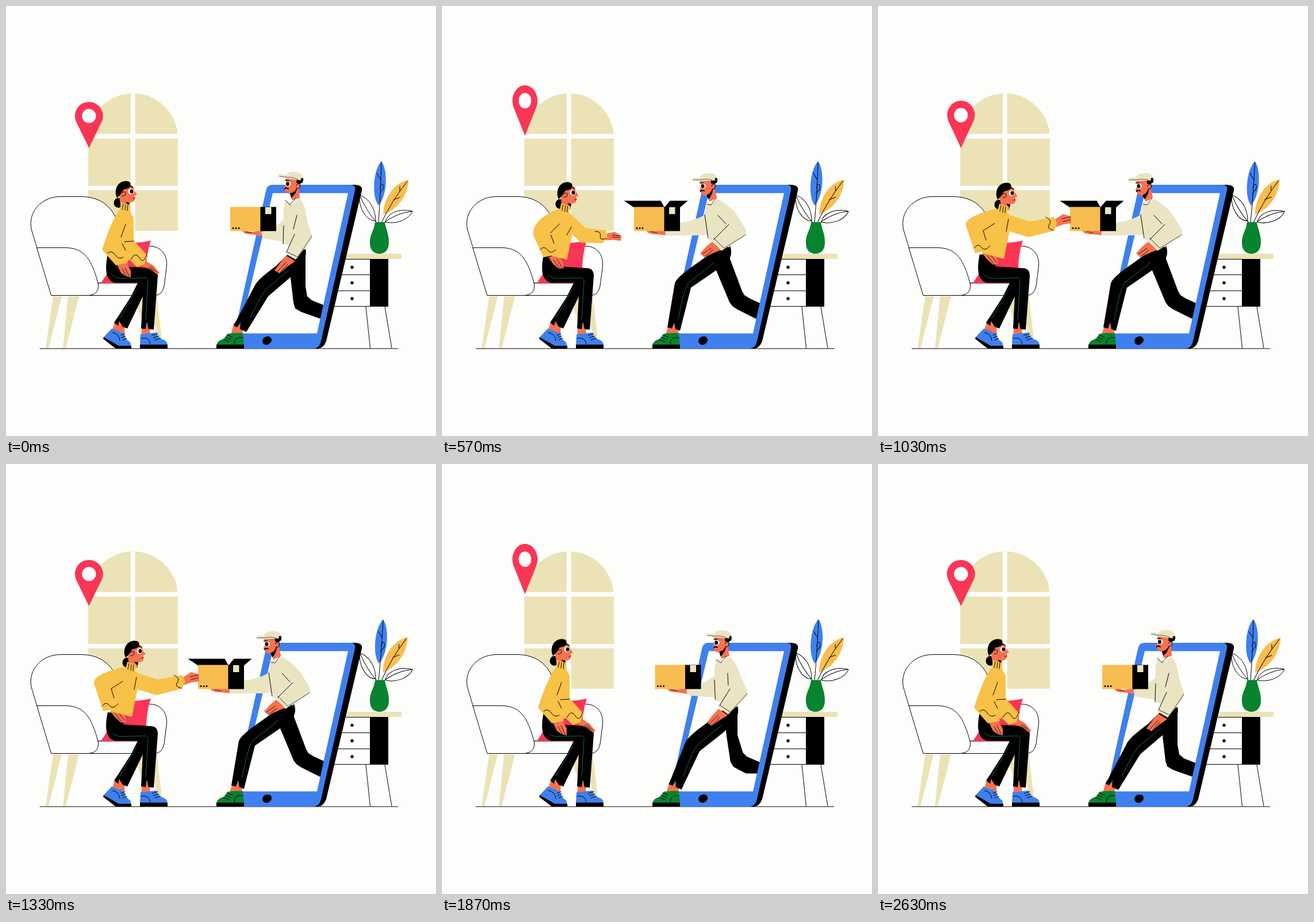
Animation of 748 by 748 pixels, one loop 2.66 s. Source, as an HTML page with a canvas:

```html
<!DOCTYPE html>
<html lang="en">
<head>
<meta charset="utf-8">
<title>Home delivery</title>
<style>
html, body { margin: 0; width: 100%; height: 100%; overflow: hidden; background: #fdfefb; }
canvas { display: block; }
</style>
</head>
<body>
<canvas id="stage" width="748" height="748"></canvas>
<script>
const ctx = document.getElementById('stage').getContext('2d');
const LOOP = 2660;
const C = {
  paper: '#fdfefb', white: '#fefefe', black: '#000', beige: '#ebe3b6', cream: '#ebe4c3',
  yellow: '#f8c148', box: '#f8bd50', red: '#fa3556', blue: '#3f80ee', green: '#08832f',
  skin: '#f6714f', seam: '#1c6250'
};

const ease = u => (1 - Math.cos(Math.PI * Math.min(1, Math.max(0, u)))) / 2;
const ramp = (t, from, to) => ease((t - from) / (to - from));
const lerp = (a, b, p) => a + (b - a) * p;

// Blends two paths that have the same commands.
function morph(a, b, p) {
  const ends = b.match(/-?[\d.]+/g);
  let i = 0;
  return a.replace(/-?[\d.]+/g, n => lerp(+n, +ends[i++], p).toFixed(2));
}
function fill(d, color) {
  ctx.fillStyle = color;
  ctx.fill(new Path2D(d));
}
function line(d, color = C.black, width = 1) {
  ctx.strokeStyle = color;
  ctx.lineWidth = width;
  ctx.stroke(new Path2D(d));
}
function outlined(d, color) {
  fill(d, color);
  line(d);
}
function rect(x, y, w, h, color) {
  ctx.fillStyle = color;
  ctx.fillRect(x, y, w, h);
}
function oval(x, y, rx, ry, color, turn = 0) {
  ctx.fillStyle = color;
  ctx.beginPath();
  ctx.ellipse(x, y, rx, ry, turn, 0, Math.PI * 2);
  ctx.fill();
}
function moved(x, y, draw) {
  ctx.save();
  ctx.translate(x, y);
  draw();
  ctx.restore();
}
function turned(x, y, angle, draw) {
  moved(x, y, () => {
    ctx.rotate(angle);
    ctx.translate(-x, -y);
    draw();
  });
}

function drawWindow() {
  fill('M143 391 V230 A78 78 0 0 1 299 230 V391Z', C.beige);
  rect(217, 150, 7.5, 242, C.paper);
  rect(142, 222.5, 158, 8, C.paper);
  rect(142, 313, 158, 7.5, C.paper);
}

// time, lift, width, height
const PIN = [
  [0, 0, 1, 1], [650, -22, .89, 1.1], [780, 0, 1.08, .9],
  [850, 0, 1.08, .9], [1050, 0, .98, 1.03], [1200, 0, 1, 1], [1330, 0, 1, 1]
];
function drawPin(time) {
  const t = time % 1330;
  const i = PIN.findIndex(k => k[0] > t);
  const a = PIN[i - 1], b = PIN[i];
  const [, lift, sx, sy] = a.map((v, k) => lerp(v, b[k], ramp(t, a[0], b[0])));
  moved(144.3, 247 + lift, () => {
    ctx.scale(sx, sy);
    ctx.fillStyle = C.red;
    ctx.beginPath();
    ctx.arc(0, -55.7, 24.4, Math.PI * .856, Math.PI * 2.144);
    ctx.lineTo(0, 0);
    ctx.fill();
    oval(0, -55.7, 12.2, 12.2, C.white);
  });
}

function drawChair() {
  fill('M82 505 H97 L74 595 H69Z M108 505 H127 L104 595 H99Z', C.beige);
  fill('M222 503 H240 L256 595 H251Z M246 503 H262 L273 595 H268Z', C.beige);
  outlined('M54 421 L44 388 C38 358 62 331.5 95 331.5 H130 C166 331.5 187 351 195 380 L215 482 H90Z', C.white);
  outlined('M236 419 Q247 417 255 418 C272 421 282 435 279 456 L275 487 Q272 503.500 258 503.500 H141 V482 H236Z', C.white);
  fill('M200 411 Q228 414 252 408 Q242 436 244 482 H165 L186 450Z', C.red);
  outlined('M54 420.500 H103 C136 420.500 149 440 160.500 484 Q162 503.500 141 503.500 H79Z', C.white);
}

function drawCabinet() {
  rect(570, 440, 63, 83, C.white);
  line('M570 440.500 H633 M570 467.500 H633 M570 495.500 H633 M570 522.500 H633');
  line('M626 523 L633.500 595 M659 523 L671 595');
  rect(633, 440, 32, 83, C.black);
  rect(588, 431, 100, 9, C.beige);
  for (const y of [454.5, 481.5, 509]) oval(602, y, 2.7, 2.7, C.black);
}

function drawPlant(time) {
  const sway = (1 - Math.cos(time / LOOP * Math.PI * 2)) / 2;
  const leaf = (angle, draw) => turned(650, 376, angle * sway, draw);
  leaf(.01, () => {
    outlined('M643 374 C627 374 613 352 615 329 C631 334 643 352 643 374Z', C.white);
    line('M616 331 Q627 357 646 378');
  });
  leaf(.01, () => {
    outlined('M660 376 C662 361 684 351 707 357 C700 373 677 380 660 376Z', C.white);
    line('M706 357 Q679 360 656 378');
  });
  leaf(-.025, () => {
    fill('M656 363 C657 336 672 309 700.500 302 C699 331 680 354 656 363Z', C.box);
    line('M698 305 Q671 339 653 377 M685 322 V314 M674 337 L685 333');
  });
  leaf(.028, () => {
    fill('M648 347 C636 333 638 286 653 270 C665 286 663 331 648 347Z', C.blue);
    line('M653 272 Q652 326 648 377 M652 302 L645 291 M651 317 Q651 310 655 310 Q658 312 656 319 Q653 322 650 326');
  });
  fill('M642 376 H659 C661 390 666 395 666 412 C666 425 658 431 650 431 C640 431 633 425 633 412 C633 396 640 392 642 376Z', C.green);
}

function womanHead(blink) {
  oval(195.5, 342.5, 8, 8.5, C.black);
  fill('M195 322 L215 309 Q222 313 223 321 L228 328 L223.500 330 Q226 339 220 341 L214 342 L214 352 L200 350Z', C.skin);
  fill('M208 341 L215 342 L214 348Z', C.black);
  fill('M191 328 C189 310 202 302 213 305 Q218 307 216 314 Q214 318 205 319 L199 328 L193 334Z', C.black);
  line('M202 325 Q208 320 208 327 Q206 332 202 330');
  line('M221 335 L224 334', '#9c1d20', 1.5);
  if (blink) {
    line('M214 323 Q218 326 222 322', C.black, 1.2);
  } else {
    oval(217.5, 322.5, 5, 4.8, C.white);
    oval(218.5, 322.5, 3, 3.6, C.black);
  }
  line('M213 315 Q218 312 221 316', C.black, 1.4);
}

function drawWomanLegs() {
  fill('M191 545 L207 552 L206 572 L185 563Z M237 555 H251 L250 573 H235Z', C.skin);
  fill('M231 478 H243 L238 505 L211 561 L203 558 L197 548 L195 556 L188 551 L217 506Z', C.black);
  fill('M177 432 C172 455 172 478 190 481.500 H239 L235 561 L243 562 L245 550 L248 562 L257 563 L264 470 Q264 456 252 456 L205 453 L195 433Z', C.black);
  line('M184 468 Q190 474 203 474 L242 473 Q247 473 247 479 L243 545', C.seam);
  line('M227 492 L198 543', C.seam);

  fill('M184 561 L206 570 Q207 580 216 585 L218 592 H196 L169 577Z', C.blue);
  fill('M170 576 L196 591 H218 V596 H191 L169 579Z', C.black);
  line('M200 573 L207 570 M201 577 L208 574 M203 581 L210 578 M185 568 Q197 570 198 582');
  fill('M234 571 L262 568 Q264 578 275 581 Q281 584 281 590 H233Z', C.blue);
  rect(233, 589, 48, 7, C.black);
  line('M254 573 L264 570 M256 577 L266 574 M259 581 L268 578 M235 578 Q249 575 251 588');
}

function drawWoman(p, blink) {
  const m = (a, b) => morph(a, b, p);
  drawWomanLegs();
  // hands
  fill(m('M232 451 L246 445 L257 452 L267 464 L263 467 L251 458Z',
    'M308 385 L308 371 L322 362 L336 366 L336 378 L322 380Z'), C.skin);
  line(m('M252 453 L262 463 M248 454 L258 461', 'M320 370 L334 367 M322 375 L334 372'), C.black, .8);
  fill(m('M193 450 L209 446 L217 460 L217 472 L208 470 L200 464Z',
    'M181 430 L196 426 L207 437 L209 448 L200 450 L190 441Z'), C.skin);
  line(m('M202 457 L210 471 M207 455 L214 470', 'M190 434 L201 448 M196 433 L206 446'), C.black, .8);
  // head and sweater
  moved(15 * p, 3 * p, () => womanHead(blink));
  fill(m('M198 354 L216 356 L222 378 L222 410 L214 443 L183 437 L172 420 L185 380Z',
    'M203 354 L224 358 L231 375 L228 395 L219 440 L182 430 L175 405 L175 368Z'), C.yellow);
  fill(m('M214 355 L222 368 L222 408 L246 434 L241 449 L228 454 L203 430 L200 380Z',
    'M218 355 L230 364 L264 375 L306 367 L312 378 L306 391 L262 402 L222 390Z'), C.yellow);
  fill(m('M208 357 L196 356 Q182 377 167 424 L191 451 L212 447 L204 412 L209 380Z',
    'M218 356 L203 353 Q144 369 154 385 L169 430 L195 424 L183 392 L205 378Z'), C.yellow);
  fill(m('M200 341 L216 346 L215 357 L198 355Z', 'M211 344 L226 349 L224 361 L208 357Z'), C.yellow);
  line(m('M204 344 L202 354 M208 345 L207 355 M212 346 L211 356',
    'M214 347 L212 357 M218 348 L217 359 M222 349 L221 360'));
  line(m('M208 380 L200 402', 'M203 378 L183 391'));
  line(m('M202 413 L208 425', 'M183 391 L188 407'));
  line(m('M222 409 L206 410', 'M227 371 L223 392'));
  line(m('M177 430 Q184 424 190 433 T204 437', 'M167 421 Q174 412 180 420 T195 417'));
  line(m('M217 441 Q225 426 232 438 T245 432', 'M292 367 Q304 373 298 380 T305 390'));
}

function drawPhone(backLeg) {
  fill('M470 311 H608 Q621 312 619 321 L557 583 Q552 596 542 596 H500Z', C.black);
  fill('M460 320 H600 L545 575 H402Z', C.white);
  fill(backLeg, C.black);
  const frame = new Path2D('M463 311 H599 Q609 311 607 321 L548 583 Q545 596 534 596 H400 Q391 595 394 585 L452 322 Q454 311 463 311Z M464 325.500 L406 569.500 H541 L595 325.500Z');
  ctx.fillStyle = C.blue;
  ctx.fill(frame, 'evenodd');
  oval(454, 582, 8.3, 7, C.black, -.5);
}

function manHead() {
  fill('M487 299 L512 301 L510 318 L511 334 L497 338 L495 327 Q486 326 486 321 L483 316 L487 308Z', C.skin);
  fill('M494 326 Q503 324 506 316 Q507 324 496 334Z', C.black);
  fill('M506 300 L517 303 L516 307 L510 310 L505 307Z', C.black);
  line('M505 312 Q511 305 512 312 Q510 320 505 317');
  oval(490.5, 309.5, 5, 4.4, C.white);
  oval(490, 309.5, 3, 3.4, C.black);
  line('M485 318 Q486 315 491 318', C.black, 2);
  line('M486 303 L492 304', C.black, 1.3);
  fill('M475 292 L488 294 Q489 288 502 288.500 Q518 289 518 304 L488 300 L475 296Z', C.cream);
  line('M475 296 L489 298 Q499 297 508 302', C.black, .6);
  oval(515, 302, 2.2, 2.8, C.black);
}

function drawBox(p, open) {
  moved(lerp(390, 334, p), 349.5, () => {
    if (open > 0) {
      const angle = open * 2.5;
      const lift = -lerp(10, 18, open) * Math.sin(angle);
      const out = -Math.cos(angle);
      const inner = Math.max(out, -.2);
      fill(`M0 1 L${-22 * out} ${lift} L${53 - 8 * inner} ${lift} L53 1Z`, C.black);
      fill(`M53 1 L${53 + 12 * inner} ${lift} L${80 + 17 * out} ${lift} L80 1Z`, C.black);
    }
    rect(0, 0, 53, 42, C.box);
    rect(52.5, 0, 27.5, 42, C.black);
    rect(61, 0.5, 10.5, 12, C.cream);
    for (let i = 0; i < 3; i++) oval(5 + i * 5, 37, 1.5, 1.5, C.black);
  });
}

function drawMan(p, open) {
  const m = (a, b) => morph(a, b, p);
  drawPhone(m('M521 423 L521 488 L524 505 L532 512 L562 524 L558 548 L513 532 L503 526 L500 516 L493 455 L500 430Z',
    'M501 418 L501 440 L522 496 L526 503 L536 509 L562 521 L558 550 L514 528 L505 522 L500 515 L472 448 L485 425Z'));
  // front foot
  fill(m('M397 550 L413 560 L411 574 L391 572Z', 'M396 550 L411 558 L411 573 L389 571Z'), C.skin);
  fill('M386 570 Q400 568 412 569 L414 590 H366 Q367 582 379 579Z', C.green);
  rect(366, 589, 48, 7, C.black);
  line('M384 572 L394 576 M381 576 L391 580 M378 580 L388 584 M412 577 Q397 574 397 588');
  fill(m('M488 434 L520 417 Q525 434 516 446 L497 470 L456 505 L418 567 L407 562 L408 550 L402 559 L396 556 L434 484 Q440 474 470 452Z',
    'M472 427 L500 414 Q507 432 498 442 L478 459 L433 490 L414 565 L406 562 L404 550 L400 561 L392 559 L405 482 Q408 472 440 450Z'), C.black);
  line(m('M492 460 L454 491 Q444 502 425 542', 'M474 446 L431 480 Q422 485 411 545'), C.seam);
  // far arm with parcel
  fill(m('M447 390 L428 393 L411 390 Q412 397 426 397 L449 401Z',
    'M391 387 L376 391 L355 390 Q357 397 372 397 L391 399Z'), C.skin);
  line(m('M417 393 L428 395', 'M363 392 L374 395'), C.black, .7);
  fill(m('M485 370 L485 410 Q466 408 447 404 L444 393 Q465 388 485 370Z',
    'M459 362 L470 398 Q430 400 389 399 L388 377 Q430 380 459 362Z'), C.cream);
  drawBox(p, open);
  // body
  moved(-34 * p, 2 * p, () => turned(500, 325, -.17 * p, manHead));
  fill(m('M486 337 L498 344 L511 335 Q521 346 524 375 L522 424 L481 414 L483 350Z',
    'M462 341 L468 345 L480 336 Q497 344 512 362 L500 420 L465 407 L456 364Z'), C.cream);
  line(m('M486 338 L494 346 L504 334', 'M461 345 L468 346 L476 335'), C.black, .8);
  fill(m('M487 434 L503 444 L490 453 L476 465 L467 460 L476 448Z',
    'M470 410 L486 424 L474 429 L456 437 L449 430 L460 418Z'), C.skin);
  line(m('M487 446 L472 462 M490 449 L477 464', 'M468 421 L453 432 M471 425 L457 436'), C.black, .8);
  fill(m('M511 335 L523 370 L532 398 Q534 405 528 411 L504 441 L486 431 L506 398 L500 360Z',
    'M480 336 L512 362 L528 388 Q532 397 524 402 L486 426 L469 407 L493 382 L478 360Z'), C.cream);
  line(m('M506 364 L500 388', 'M480 364 L494 379'));
  line(m('M502 397 L488 428', 'M499 380 L473 406'));
  line(m('M532 400 L508 436', 'M528 398 L491 421'), C.black, .7);
  line(m('M489 428 L506 436', 'M473 404 L490 421'), C.black, .8);
  line(m('M483 382 L482 413', 'M457 363 L463 404'));
}

function render(time) {
  const walk = ramp(time, 0, 520) - ramp(time, 1560, 2080);
  const reach = ramp(time, 270, 770) - ramp(time, 1350, 1850);
  const open = ramp(time, 60, 520) - ramp(time, 1450, 1800);
  const blink = time > 280 && time < 390;
  rect(0, 0, 748, 748, C.paper);
  drawWindow();
  drawPin(time);
  drawChair();
  drawCabinet();
  drawPlant(time);
  line('M59 596 H682');
  drawMan(walk, open);
  drawWoman(reach, blink);
}

ctx.lineJoin = ctx.lineCap = 'round';
const start = performance.now();
function tick() {
  render((performance.now() - start) % LOOP);
  requestAnimationFrame(tick);
}
tick();
</script>
</body>
</html>
```
